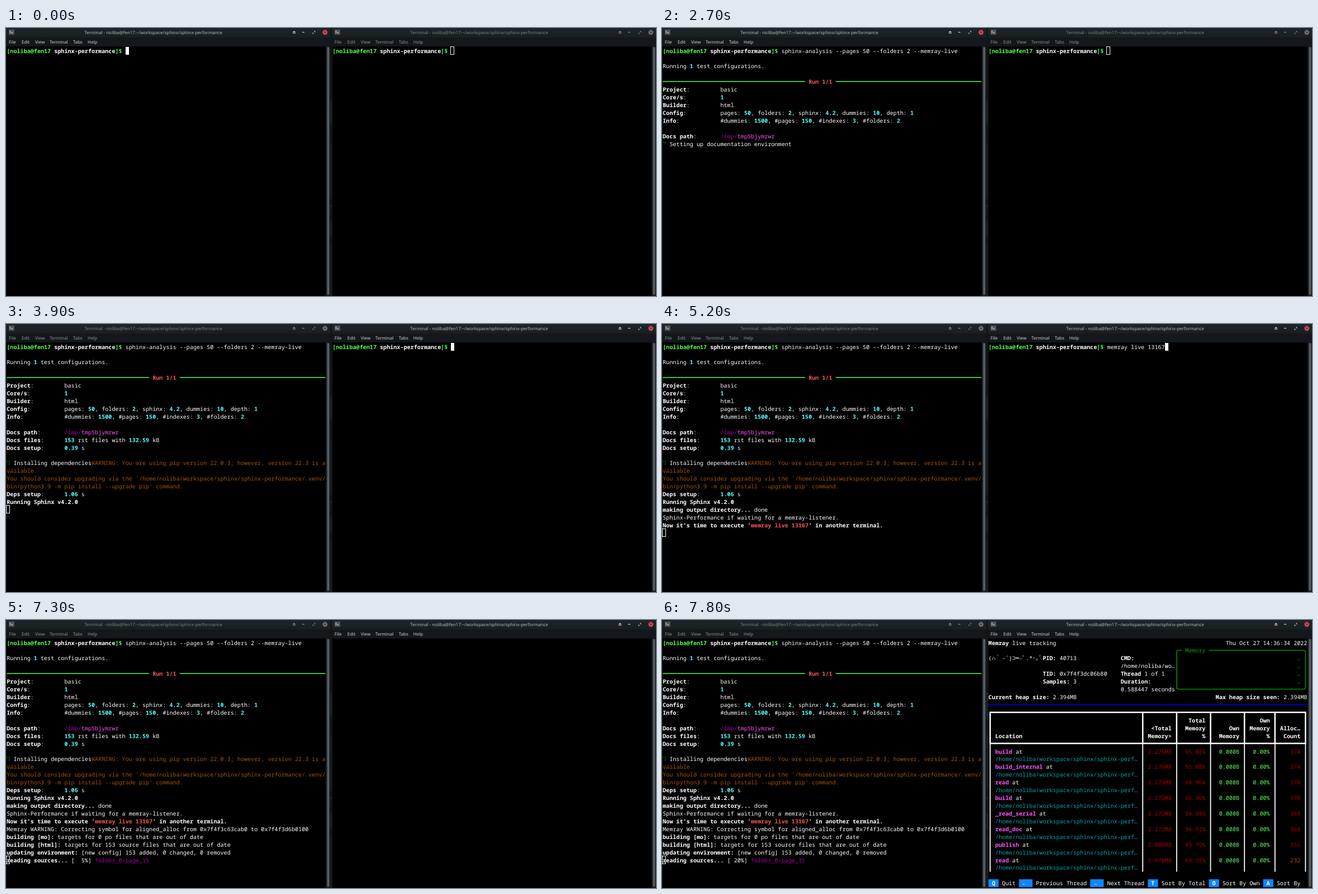
Recreate the animation shown at these times as an HTML page with a canvas. Size 1163 px wide and 481 px high, loop 8 s.

```html
<!DOCTYPE html>
<html lang="en">
<head>
<meta charset="utf-8">
<title>Two terminals</title>
<style>
  html, body { margin: 0; width: 100%; height: 100%; overflow: hidden; background: #000; }
  canvas { display: block; }
</style>
</head>
<body>
<canvas id="stage" width="1163" height="481"></canvas>
<script>
const ctx = document.getElementById('stage').getContext('2d');
ctx.textRendering = 'geometricPrecision';

const LOOP = 8000, CELL_W = 6.067, CELL_H = 13.93, TOP = 33.9, RIGHT = 582.8, COLS = 94;
const MONO = '10.11px "Noto Sans Mono", "DejaVu Sans Mono", "Noto Sans CJK JP", monospace';
const UI = '7.95px "Noto Sans", sans-serif';
const USER = 'noliba', HOST = 'fen17';
const HOME = `/home/${USER}`;
const PROMPT = `^G[${USER}@${HOST} ^Wsphinx-performance^G]$ ^w`;
const PROMPT_COLS = 35;

// Style codes used in terminal text as ^x; upper case is bold.
const COLORS = {
  w: '#fff', W: '#fff', G: '#54ff54', l: '#54ff54', g: '#00a800', C: '#54ffff', t: '#00a8a8',
  R: '#ff5454', r: '#a80000', o: '#a85400', m: '#a800a8', p: '#ff54ff', P: '#ff54ff'
};

// The picture only changes at these moments.
const STEPS = [0, 700, 1300, 2200, 2700, 2800, 2900, 3000, 3200, 3300, 3400, 3600, 3700, 3800,
  3900, 4200, 4300, 5200, 7000, 7100, 7200, 7300, 7400, 7500, 7600, 7700, 7800];

let originX = 0;
const colX = col => originX + 1.3 + col * CELL_W;
const rowY = row => TOP + row * CELL_H;

function rect(x, y, w, h, color) {
  ctx.fillStyle = color;
  ctx.fillRect(x, y, w, h);
}

function stroke(points, color, width = 1) {
  ctx.strokeStyle = color;
  ctx.lineWidth = width;
  ctx.beginPath();
  points.forEach(([x, y], i) => i ? ctx.lineTo(x, y) : ctx.moveTo(x, y));
  ctx.stroke();
}

function put(col, row, text) {
  const runs = text.startsWith('^') ? text.slice(1).split('^') : ['w' + text];
  for (const run of runs) {
    const code = run[0];
    ctx.font = (code < 'a' ? 'bold ' : '') + MONO;
    ctx.fillStyle = COLORS[code];
    for (const ch of run.slice(1)) ctx.fillText(ch, colX(col++), rowY(row) + 10.6);
  }
}

const putRight = (endCol, row, code, text) => put(endCol - [...text].length, row, `^${code}${text}`);

function cursor(col, row, filled) {
  if (filled) return rect(Math.round(colX(col)), Math.round(rowY(row)), 6, 14, '#fff');
  ctx.strokeStyle = '#fff';
  ctx.lineWidth = 1;
  ctx.strokeRect(Math.round(colX(col)) - .5, Math.round(rowY(row)) - .5, 6, 14);
}

function spinner(row, index) {
  const glyph = [...'⠋⠙⠹⠸⠼⠴⠦⠧⠇⠏'][index % 10].codePointAt(0) - 0x2800;
  for (let dot = 0; dot < 6; dot++) {
    if (glyph >> dot & 1)
      rect(colX(0) + 1 + 2.8 * Math.floor(dot / 3), rowY(row) + 3 + 2.4 * (dot % 3), 1.3, 1.3, COLORS.g);
  }
}

function drawWindow(x, active, menuActive) {
  originX = x;
  const left = Math.round(x);
  const bar = ctx.createLinearGradient(0, 0, 0, 17);
  bar.addColorStop(0, '#1d2528');
  bar.addColorStop(1, '#191e22');
  rect(left, 0, 580, 17, bar);
  rect(left, 17, 580, 16, '#14171b');
  rect(left, 33, 572, 448, '#000');
  rect(left, 33, 1, 448, '#16191c');
  rect(left + 572, 33, 8, 448, '#171b1f');
  ctx.fillStyle = '#595e65';
  ctx.beginPath();
  ctx.roundRect(left + 574.5, 34, 4, 445, 2);
  ctx.fill();

  rect(left + 5, 3, 10, 9, '#54595b');
  stroke([[left + 6.5, 5], [left + 8.5, 6.7], [left + 6.5, 8.4]], '#e0e0e0');
  stroke([[left + 9, 8.5], [left + 12, 8.5]], '#e0e0e0');

  ctx.font = UI;
  ctx.textAlign = 'center';
  ctx.fillStyle = active ? '#b4babc' : '#7c8285';
  ctx.fillText(`Terminal - ${USER}@${HOST}:~/workspace/sphinx/sphinx-performance`, x + 263.6, 10.7);
  ctx.textAlign = 'left';
  ctx.fillStyle = menuActive ? '#d3d5d6' : '#909497';
  const menu = { File: 5, Edit: 28, View: 52, Terminal: 78, Tabs: 120, Help: 146 };
  for (const name in menu) ctx.fillText(name, x + menu[name], 27.8);

  const icon = active ? '#c9cdce' : '#83888b';
  ctx.fillStyle = icon;
  ctx.beginPath();
  ctx.moveTo(left + 512.5, 8);
  ctx.lineTo(left + 515.5, 5);
  ctx.lineTo(left + 518.5, 8);
  ctx.fill();
  rect(left + 513, 9, 5, 1, icon);
  rect(left + 530, 7, 4, 1.2, icon);
  stroke([[left + 551, 6], [left + 553, 6], [left + 553, 8]], icon);
  stroke([[left + 549, 8], [left + 549, 10], [left + 551, 10]], icon);
  ctx.fillStyle = active ? '#d44a50' : '#6d7275';
  ctx.beginPath();
  ctx.arc(left + 570.8, 7.8, 4.4, 0, 7);
  ctx.fill();
  for (const d of [-1.7, 1.7]) stroke([[left + 570.8 - d, 6.1], [left + 570.8 + d, 9.5]], '#202528');
}

function drawGap() {
  rect(580, 0, 3, 481, '#101517');
  for (const [y, h, color] of [[130, 43, '#1b4440'], [205, 100, '#1c2930'], [318, 3, '#3c484c'],
    [348, 28, '#28393c'], [388, 92, '#1b262c']]) rect(581, y, 1, h, color);
}

function drawBuild(t) {
  const typed = t < 700 ? '' : t < 1300 ? 'clear' : 'sphinx-analysis --pages 50 --folders 2 --memray-live';
  put(0, 0, PROMPT + typed);
  if (t < 2200) return cursor(PROMPT_COLS + typed.length, 0, true);
  if (t < 2700) return cursor(0, 1, true);

  const field = (row, name, value) => put(0, row, `^W${name}^w${':'.padEnd(17 - name.length)}${value}`);
  put(0, 2, 'Running ^C1^w test configurations.'.replace(/^/, '^w'));
  const ruleY = rowY(4) + 6.4;
  stroke([[colX(0), ruleY], [colX(42), ruleY]], COLORS.G, 1.7);
  put(43, 4, '^RRun 1/1');
  stroke([[colX(51), ruleY], [colX(COLS), ruleY]], COLORS.G, 1.7);
  field(5, 'Project', 'basic');
  field(6, 'Core/s', '^C1');
  field(7, 'Builder', 'html');
  field(8, 'Config', 'pages: ^C50^w, folders: ^C2^w, sphinx: ^C4.2^w, dummies: ^C10^w, depth: ^C1');
  field(9, 'Info', '#dummies: ^C1500^w, #pages: ^C150^w, #indexes: ^C3^w, #folders: ^C2');
  field(11, 'Docs path', '^m/tmp/^ptmp5bjymrwr');
  if (t < 3000) {
    spinner(12, 1 + Math.floor((t - 2700) / 80));
    return put(2, 12, 'Setting up documentation environment');
  }
  field(12, 'Docs files', '^C153^w rst files with ^C132.59^w kB');
  field(13, 'Docs setup', '^C0.39^w s');
  spinner(15, 2 + Math.floor((Math.min(t, 3800) - 3000) / 80));
  put(2, 15, 'Installing dependencies');
  if (t < 3800) return;

  put(25, 15, '^oWARNING: You are using pip version 22.0.3; however, version 22.3 is a');
  put(0, 16, '^ovailable.');
  put(0, 17, `^oYou should consider upgrading via the '${HOME}/workspace/sphinx/sphinx-performance/.venv/`);
  put(0, 18, "^obin/python3.9 -m pip install --upgrade pip' command.");
  if (t < 3900) return;

  field(19, 'Deps setup', '^C1.06^w s');
  put(0, 20, '^WRunning Sphinx v4.2.0');
  if (t < 4200) return cursor(0, 21, false);
  put(0, 21, '^Wmaking output directory... ^wdone');
  put(0, 22, 'Sphinx-Performance if waiting for a memray-listener.');
  put(0, 23, "^WNow it's time to execute '^Rmemray live 13167^W' in another terminal.");
  if (t < 7100) return cursor(0, 24, false);
  put(0, 24, 'Memray WARNING: Correcting symbol for aligned_alloc from 0x7f4f3c63cab0 to 0x7f4f3d6b0100');
  if (t < 7200) return cursor(0, 25, false);
  put(0, 25, '^Wbuilding [mo]: ^wtargets for 0 po files that are out of date');
  put(0, 26, '^Wbuilding [html]: ^wtargets for 153 source files that are out of date');
  put(0, 27, '^Wupdating environment: ^w[new config] 153 added, 0 changed, 0 removed');

  // Documents are read in alphabetical order, the index first.
  const pages = Array.from({ length: 50 }, (_, i) => `page_${i}`).sort();
  const count = Math.round(9 + (t - 7300) * .044);
  const percent = String(Math.floor(count * 100 / 153)).padStart(3);
  put(0, 28, `^Wreading sources... ^w[${percent}%] ^mfolder_0/${pages[count - 2]}`);
  cursor(0, 28, false);
}

function drawTracker() {
  put(0, 0, '^WMemray^w live tracking');
  putRight(COLS, 0, 'w', 'Thu Oct 27 14:36:34 2022');
  put(0, 2, '(∩｀ -´)⊃━☆ﾟ.*･｡ﾟ');
  put(16, 2, '^WPID:^w 40713');
  put(16, 4, '^WTID:^w 0x7f4f3dc06b80');
  put(16, 5, '^WSamples:^w 3');
  put(39, 2, '^WCMD:');
  put(39, 3, `${HOME}/wo…`);
  put(39, 4, '^WThread^w 1 of 1');
  put(39, 5, '^WDuration:');
  put(39, 6, '0.588447 seconds');
  put(0, 7, '^WCurrent heap size:^w 2.394MB');
  put(67, 7, '^WMax heap size seen:^w 2.394MB');

  const mid = col => colX(col + .5);
  ctx.strokeStyle = COLORS.g;
  ctx.lineWidth = 1.3;
  ctx.beginPath();
  ctx.roundRect(mid(55), rowY(1) + 6.6, mid(93) - mid(55), 5 * CELL_H, 3);
  ctx.stroke();
  rect(colX(57), rowY(1), 8 * CELL_W, CELL_H, '#000');
  put(58, 1, '^gMemory');
  for (let row = 2; row < 6; row++) put(91, row, '^g…');
  stroke([[colX(0), rowY(8) + 6.6], [colX(COLS) - 2, rowY(8) + 6.6]], '#0000a8', 2.6);

  const top = rowY(9) + 6.4, headEnd = rowY(13) + 6.4;
  for (const y of [top, headEnd]) stroke([[mid(0) - 1.2, y], [mid(93) + 1.2, y]], '#fff', 2.5);
  for (const col of [0, 45, 55, 65, 75, 84, 93]) {
    stroke([[mid(col), top], [mid(col), headEnd]], '#fff', 2.5);
    stroke([[mid(col), headEnd], [mid(col), rowY(30)]], '#fff', 1.8);
  }
  put(2, 12, '^WLocation');
  const ends = [54, 64, 74, 83, 92];
  [['<Total', 'Memory>'], ['Total', 'Memory', '%'], ['Own', 'Memory'], ['Own', 'Memory', '%'], ['Alloc…', 'Count']]
    .forEach((lines, i) => lines.forEach((line, j) => putRight(ends[i], 13 - lines.length + j, 'W', line)));

  const entries = `build 2.276 95.08 374
build_internal 2.276 95.08 374
read 2.273 94.96 370
build 2.273 94.96 370
_read_serial 2.273 94.94 369
read_doc 2.272 94.91 368
publish 2.006 83.79 351
read 1.670 69.78 232`;
  entries.split('\n').forEach((entry, i) => {
    const [name, total, share, allocations] = entry.split(' ');
    const row = 14 + 2 * i;
    put(2, row, `^P${name}^w at`);
    put(2, row + 1, `^t${HOME}/workspace/sphinx/sphinx-perf…`);
    putRight(ends[0], row, 'r', total + 'MB');
    putRight(ends[1], row, 'r', share + '%');
    putRight(ends[2], row, 'l', '0.000B');
    putRight(ends[3], row, 'l', '0.00%');
    putRight(ends[4], row, allocations < 300 ? 'o' : 'r', allocations);
  });

  let col = 0;
  for (const [key, label] of [['Q', 'Quit'], ['←', 'Previous Thread'], ['→', 'Next Thread'],
    ['T', 'Sort By Total'], ['O', 'Sort By Own'], ['A', 'Sort By']]) {
    const width = /\w/.test(key) ? 3 : 4;
    rect(colX(col), rowY(31) - .4, width * CELL_W, CELL_H, '#0c87ff');
    put(col + 1, 31, `^W${key}`);
    put(col + width + 1, 31, label);
    col += width + label.length + 2;
  }
}

function drawListener(t) {
  if (t >= 7600) return drawTracker();
  if (t >= 7200) return;
  const typed = t < 4300 ? '' : t < 5200 ? 'clear' : 'memray live 13167';
  put(0, 0, PROMPT + typed);
  if (t < 7000) cursor(PROMPT_COLS + typed.length, 0, t >= 3300);
  else cursor(0, 1, true);
}

function draw(t) {
  const rightActive = t >= 3300, rightMenu = t >= 3600;
  drawWindow(0, !rightActive, !rightMenu);
  drawBuild(t);
  drawWindow(RIGHT, rightActive, rightMenu);
  drawListener(t);
  drawGap();
}

const start = performance.now();
let shown = -1;
function tick() {
  const time = (performance.now() - start) % LOOP;
  const step = STEPS.findLast(s => s <= time);
  if (step !== shown) draw(shown = step);
  requestAnimationFrame(tick);
}
tick();
</script>
</body>
</html>
```
